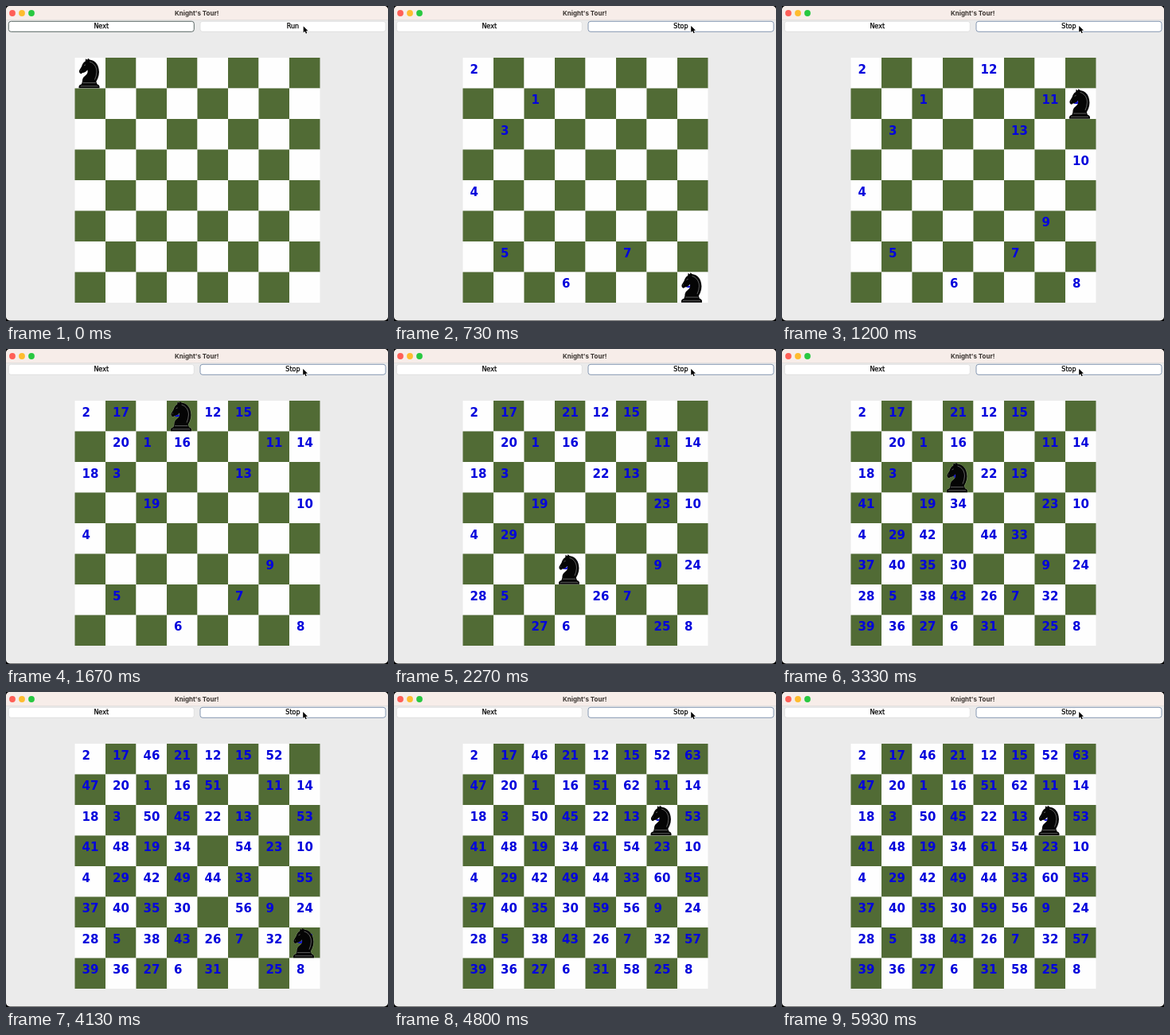
These frames come from a looping animation (480x396 px, 6540 ms). An HTML page with a canvas:

```html
<!DOCTYPE html>
<html lang="en">
<head>
<meta charset="utf-8">
<title>Knight's Tour!</title>
<style>
  html, body { margin: 0; width: 100%; height: 100%; overflow: hidden; background: #000; }
  canvas { display: block; width: 480px; height: 396px; }
</style>
</head>
<body>
<canvas id="stage"></canvas>
<script>
const W = 480, H = 396, LOOP = 6540;
const LEFT = 86.5, TOP = 65, CELL = 38.5;

// Order in which the knight visits each square, row by row.
const TOUR = [
  [2, 17, 46, 21, 12, 15, 52, 63],
  [47, 20, 1, 16, 51, 62, 11, 14],
  [18, 3, 50, 45, 22, 13, 64, 53],
  [41, 48, 19, 34, 61, 54, 23, 10],
  [4, 29, 42, 49, 44, 33, 60, 55],
  [37, 40, 35, 30, 59, 56, 9, 24],
  [28, 5, 38, 43, 26, 7, 32, 57],
  [39, 36, 27, 6, 31, 58, 25, 8]
];
const stops = [[0, 0]];
TOUR.forEach((line, row) => line.forEach((n, col) => { stops[n] = [col, row]; }));

const BODY = new Path2D(
  'M5 38.2 L31 38.2 L31 36 Q30.5 33.7 28 33.2 L26.8 30 ' +
  'C30 25 31.2 19 30 14 C28.8 7 24 3.2 18.6 2.6 L16.6 .8 L15.6 2.8 L13.6 1.2 L13.2 4.4 ' +
  'C10.4 5.8 9.2 8.6 8.6 11 L5.6 16 C5 18 6 20 8 20.2 L9.6 19 ' +
  'C12 18.6 14 18 15.8 15.2 C17 19 15 21 12.6 23 C10 25 9.4 27.4 9.4 30 ' +
  'L8.4 33.2 Q5.5 33.7 5 36 Z');
const LINES = new Path2D(
  'M7 35.8 H29 M9.8 31.6 H26.4 M18.6 5 C24.4 6.6 27.6 12 27.4 18 Q27.2 23 25 27.6 ' +
  'M11.6 9.8 L13.6 8.8 M7.2 16.4 L8 15.8');
const ARROW = new Path2D('M0 0 V8 L1.9 6.3 L3.2 9.2 L4.6 8.6 L3.3 5.8 H5.8 Z');

const canvas = document.getElementById('stage');
const ctx = canvas.getContext('2d');
const dpr = window.devicePixelRatio || 1;
canvas.width = W * dpr;
canvas.height = H * dpr;

function box(x, y, w, h, r, fill, line, width = 1) {
  ctx.beginPath();
  ctx.roundRect(x, y, w, h, r);
  ctx.fillStyle = fill;
  ctx.fill();
  if (!line) return;
  ctx.strokeStyle = line;
  ctx.lineWidth = width;
  ctx.stroke();
}

function label(text, x, y, font, color = '#161616', align = 'center') {
  ctx.font = font;
  ctx.fillStyle = color;
  ctx.textAlign = align;
  ctx.fillText(text, x, y);
}

function button(x, text, ring) {
  box(x, 19.3, 233, 13, 3, '#fff', ring || '#d8d8d8', ring ? 1 : 0.7);
  const font = '8px "DejaVu Sans", sans-serif';
  label(text, x + 116.4, 28.4, font, '#000');
  ctx.strokeStyle = '#000';
  ctx.lineWidth = 0.25;
  ctx.strokeText(text, x + 116.4, 28.4);
}

function drawWindow(running, focused) {
  ctx.fillStyle = '#000';
  ctx.fillRect(0, 0, W, H);
  ctx.save();
  ctx.beginPath();
  ctx.roundRect(0, 0, W, H - 0.6, 5);
  ctx.clip();
  ctx.fillStyle = '#ebebeb';
  ctx.fillRect(0, 0, W, H);
  ctx.fillStyle = '#f7ede9';
  ctx.fillRect(0, 0, W, 17);
  ctx.fillStyle = '#dfd9d6';
  ctx.fillRect(0, 17, W, 0.6);
  ctx.restore();

  ['#ff5f57', '#febc2e', '#28c840'].forEach((color, i) => {
    ctx.beginPath();
    ctx.arc(8 + 12 * i, 9, 3.9, 0, 7);
    ctx.fillStyle = color;
    ctx.fill();
  });
  label("Knight's Tour!", 239.7, 11.6, 'bold 8px Inter, sans-serif', '#39332f');
  button(3.3, 'Next', focused ? '' : '#5b6866');
  button(244, running ? 'Stop' : 'Run', focused ? '#8598b2' : '');
}

function drawBoard(step) {
  for (let row = 0; row < 8; row++) {
    for (let col = 0; col < 8; col++) {
      const x = LEFT + col * CELL, y = TOP + row * CELL;
      ctx.fillStyle = (row + col) % 2 ? '#516b35' : '#fefefe';
      ctx.fillRect(x, y, CELL, CELL);
      const n = TOUR[row][col];
      if (n <= step) {
        label(n, x + 9, y + 19.5, 'bold 15px "DejaVu Sans", sans-serif', '#0404dc', 'left');
      }
    }
  }
}

function drawKnight([col, row]) {
  ctx.save();
  ctx.translate(LEFT + col * CELL, TOP + row * CELL);
  ctx.lineJoin = 'round';
  ctx.strokeStyle = 'rgba(235,235,235,.35)';
  ctx.lineWidth = 0.9;
  ctx.stroke(BODY);
  ctx.fillStyle = '#050505';
  ctx.fill(BODY);
  ctx.strokeStyle = 'rgba(235,235,235,.65)';
  ctx.lineWidth = 0.6;
  ctx.stroke(LINES);
  ctx.restore();
}

function drawPointer(x, y) {
  ctx.save();
  ctx.translate(x, y);
  ctx.strokeStyle = '#fff';
  ctx.lineWidth = 1.2;
  ctx.stroke(ARROW);
  ctx.fillStyle = '#000';
  ctx.fill(ARROW);
  ctx.restore();
}

function render(now) {
  // The screen ticks 15 times a second; the knight moves slightly slower.
  const tick = Math.floor((now % LOOP) * 0.015 + 0.06);
  const step = Math.max(0, Math.min(64, Math.floor(tick * 0.96 - 2.35)));
  const focused = tick >= 1;
  ctx.setTransform(dpr, 0, 0, dpr, 0, 0);
  drawWindow(tick >= 3, focused);
  drawBoard(step);
  drawKnight(stops[step]);
  drawPointer(focused ? 373.2 : 373.7, focused ? 25 : 25.5);
}

const start = performance.now();
function loop() {
  render(performance.now() - start);
  requestAnimationFrame(loop);
}
loop();
</script>
</body>
</html>
```
